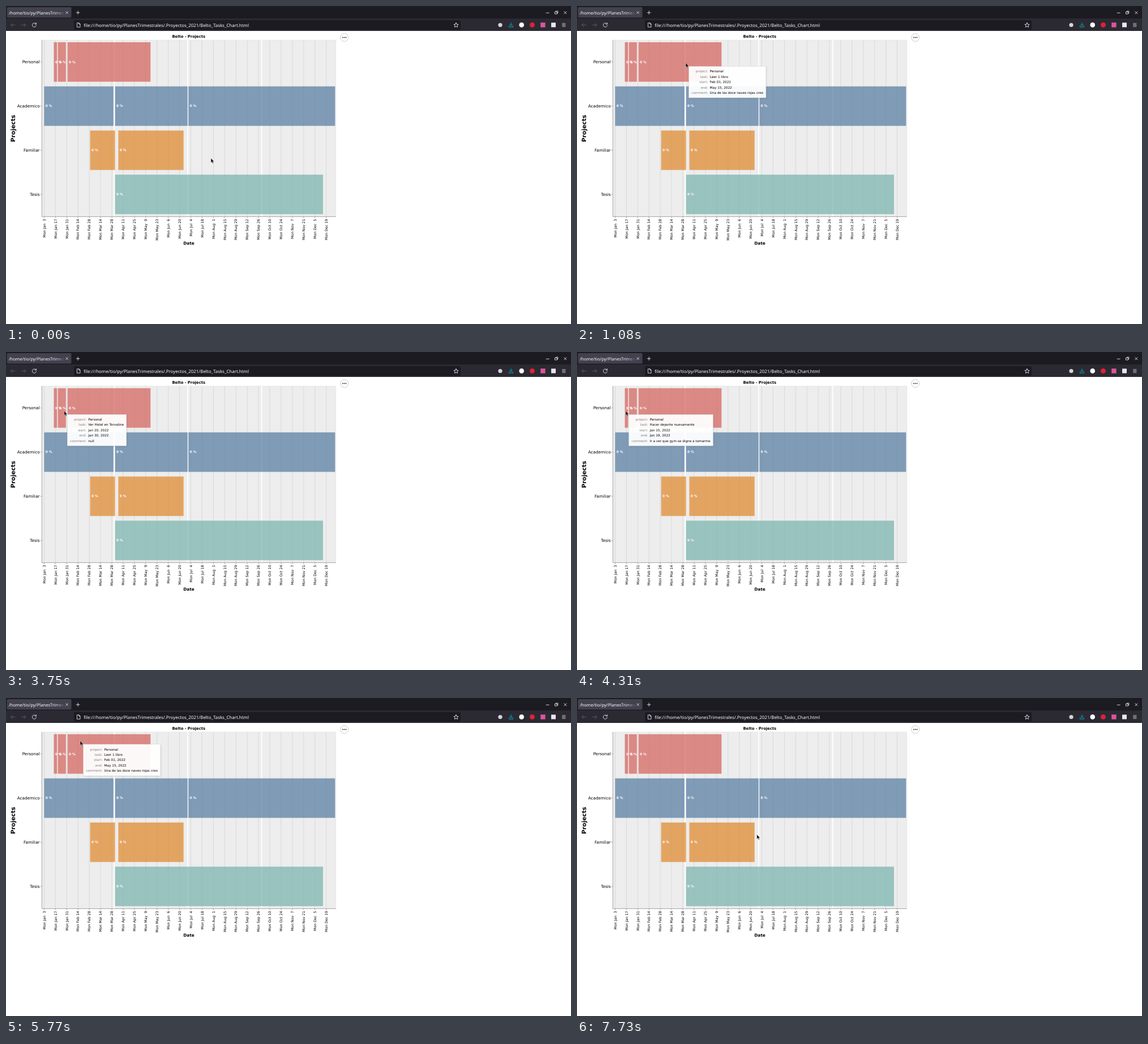
Write an HTML page that moves like this. It is 998 by 561 pixels and loops after 8 s.

```html
<!DOCTYPE html>
<html lang="es">
<head>
<meta charset="utf-8">
<title>Projects</title>
<style>
  html, body { margin: 0; width: 100%; height: 100%; overflow: hidden; background: #fff; }
  svg { display: block; width: 100%; height: 100%; }
  text { font-family: "DejaVu Sans", sans-serif; white-space: pre; text-rendering: geometricPrecision; }
  .ui { font-family: "Noto Sans", "Open Sans", sans-serif; fill: #fbfbfe; }
  .bold { font-weight: bold; }
  .mid { text-anchor: middle; }
  .end { text-anchor: end; }
  .line { fill: none; stroke: #fbfbfe; stroke-width: .8; stroke-linecap: round; stroke-linejoin: round; }
  .dim { stroke: #65646e; }
  .grid { stroke: #d2d2d2; stroke-width: .7; }
  .axis { stroke: #888; stroke-width: .7; fill: none; }
  .percent { font-size: 5.72px; fill: #fff; }
  #tip text { font-size: 5.72px; }
  #tip .key { fill: #808080; }
  #box { fill: #fff; fill-opacity: .95; stroke: #d9d9d9; stroke-width: .5; filter: drop-shadow(1px 1px 1px rgba(0,0,0,.12)); }
</style>
</head>
<body>
<svg viewBox="0 0 998 561" preserveAspectRatio="none">
  <defs>
    <linearGradient id="fade" gradientUnits="userSpaceOnUse" x1="86" x2="104" y1="0" y2="0">
      <stop stop-color="#fbfbfe"/><stop offset="1" stop-color="#fbfbfe" stop-opacity="0"/>
    </linearGradient>
    <clipPath id="tabClip"><path d="M2 2H104V20H2z"/></clipPath>
  </defs>

  <g id="browser">
    <path d="M0 0H998V22H0z" fill="#1c1b22"/>
    <path d="M0 22H998V44H0z" fill="#2b2a33"/>
    <rect x="1.5" y="2" width="114" height="18.5" rx="2" fill="#42414d"/>
    <text class="ui" x="5" y="14.6" font-size="7.6" style="fill:url(#fade)" clip-path="url(#tabClip)">/home/tio/py/PlanesTrimestrales</text>
    <path class="line" d="M105.8 9.8l3.6 3.6m0-3.6l-3.6 3.6M124.2 11.7h5.8m-2.9-2.9v5.8"/>
    <path class="line" d="M954.2 12.2h5M969.8 10.4h3.6v3.6h-3.6zM971.3 10.2V9h3.6v3.6h-1.2M985.8 9.6l4.2 4.2m0-4.2l-4.2 4.2"/>
    <path class="line dim" d="M16 33.5H8.6m3-3l-3 3 3 3M27.4 33.5h7.4m-3-3l3 3-3 3"/>
    <path class="line" d="M53 31.6a3.6 3.6 0 1 0 .5 2.6M53.4 29.6v2.4H51"/>
    <rect x="120" y="25" width="683" height="17" rx="2" fill="#1c1b22"/>
    <path class="line" d="M125.8 29.8h3.2l2 2v5.4h-5.2zM128.8 30v2h2"/>
    <text class="ui" x="137.3" y="36.5" font-size="7.89">file:///home/tio/py/PlanesTrimestrales/.Proyectos_2021/Belto_Tasks_Chart.html</text>
    <path class="line" d="M795 29.6l1.2 2.6 2.9.3-2.2 1.9.7 2.9-2.6-1.5-2.6 1.5.7-2.9-2.2-1.9 2.9-.3z"/>
    <circle cx="873" cy="33.5" r="3.6" fill="#d4d4da"/>
    <path class="line" style="stroke:#00c8e8" d="M892 29.6v5m-2.2-2.1l2.2 2.2 2.2-2.2M888.5 35v2h7v-2"/>
    <circle cx="910.7" cy="33.4" r="4.3" fill="#fff"/>
    <circle cx="929.5" cy="33.4" r="4.4" fill="#e0203a"/>
    <rect x="944.2" y="29.2" width="8.4" height="8.4" fill="#d8579a"/>
    <rect x="963" y="29.4" width="8" height="8" fill="#e8e8ea"/>
    <path class="line" d="M982.6 31h5.4m-5.4 2.5h5.4m-5.4 2.5h5.4"/>
  </g>

  <g id="chart"></g>

  <g id="menu">
    <circle cx="597.7" cy="55.5" r="7" fill="#fff" stroke="#aaa" stroke-width=".6"/>
    <path d="M594.9 55.5h.01M597.7 55.5h.01M600.5 55.5h.01" stroke="#222" stroke-width="1.8" stroke-linecap="round"/>
  </g>

  <g id="tip"><rect id="box" height="55.3"/></g>
  <path id="cursor" d="M0 0V8L1.9 6.4 3.1 9.3 4.5 8.7 3.2 5.9H5.6z" fill="#111" stroke="#fff" stroke-width=".4"/>
</svg>

<script>
const DURATION = 8000;
const LANE_TOP = 63.9, LANE_STEP = 77.87, BAR_HEIGHT = 69.7;
const FIRST_DAY = Date.UTC(2022, 0, 3), DAY_MS = 864e5, DAY_WIDTH = 1.4235;
const $ = id => document.getElementById(id);
const dayX = day => 67.4 + day * DAY_WIDTH;

const lanes = [
  { name: 'Personal', color: '#d5605b' },
  { name: 'Academico', color: '#5379a0' },
  { name: 'Familiar', color: '#e08628' },
  { name: 'Tesis', color: '#77b3ab' }
];

// lane, first day and last day counted from Jan 3, task, comment
const bars = [
  [0, 12, 16, 'Hacer deporte nuevamente', 'Ir a ver que gym se digne a tomarme'],
  [0, 17, 27, 'Ver Hotel en Torvaline', 'null'],
  [0, 29, 132, 'Leer 1 libro', 'Una de las doce naves rojas creo'],
  [1, 0, 86, 'Primer trimestre', 'null'],
  [1, 88, 178, 'Segundo trimestre', 'Rendir los parciales a tiempo'],
  [1, 179, 361, 'Segundo semestre', 'Aprobar las materias que falten del segundo semestre'],
  [2, 57, 88, 'Ordenar la casa', 'null'],
  [2, 92, 173, 'Pintar la casa', 'null'],
  [3, 88, 346, 'Escribir la tesis', 'null']
].map(([lane, from, to, task, comment]) => ({
  lane, from, to, task, comment,
  x: dayX(from), end: dayX(to), y: LANE_TOP + lane * LANE_STEP
}));

const dateOf = day => new Date(FIRST_DAY + day * DAY_MS);
const monthOf = date => date.toLocaleString('en-US', { month: 'short', timeZone: 'UTC' });
const longDate = day => {
  const d = dateOf(day);
  return `${monthOf(d)} ${String(d.getUTCDate()).padStart(2, '0')}, 2022`;
};

function drawChart() {
  const out = ['<path d="M63.3 60H582.7V371.6H63.3z" fill="#ededed" stroke="#ddd" stroke-width=".5"/>'];
  const line = (cls, d) => out.push(`<path class="${cls}" d="${d}"/>`);
  const label = (cls, x, y, size, str, extra = '') =>
    out.push(`<text class="${cls}" x="${x}" y="${y}" font-size="${size}" ${extra}>${str}</text>`);

  for (let i = 0; i < 26; i++) {
    const x = dayX(i * 14), d = dateOf(i * 14);
    line('grid', `M${x} 60V371.6`);
    line('axis', `M${x} 371.6v2.6`);
    label('end', 0, 0, 6.24, `Mon ${monthOf(d)} ${String(d.getUTCDate()).padStart(2)}`,
      `transform="translate(${x + 2.3} 375.8) rotate(-90)"`);
  }
  for (const day of [87, 178.2, 270]) {
    out.push(`<path d="M${dayX(day)} 60V371.6" stroke="#fff" stroke-width="1.7"/>`);
  }
  for (const b of bars) {
    out.push(`<rect x="${b.x}" y="${b.y}" width="${b.end - b.x}" height="${BAR_HEIGHT}" fill="${lanes[b.lane].color}" fill-opacity=".7"/>`);
  }
  for (const b of bars) label('bold percent', b.x + 2.4, b.y + 36.7, 5.72, '0 %');

  line('axis', 'M63.3 60V371.6H582.7');
  lanes.forEach((lane, i) => {
    const y = LANE_TOP + i * LANE_STEP + BAR_HEIGHT / 2;
    line('axis', `M60.7 ${y}h2.6`);
    label('end', 59.6, y + 2.4, 7.28, lane.name);
  });
  label('bold mid', 322.7, 56.2, 6.76, 'Belto - Projects');
  label('bold mid', 323, 421.2, 7.28, 'Date');
  label('bold mid', 0, 0, 10.4, 'Projects', 'transform="translate(15.8 216) rotate(-90)"');
  $('chart').innerHTML = out.join('');
}

const values = ['project', 'task', 'start', 'end', 'comment'].map((key, i) => {
  const add = (cls, x, str) => {
    const el = document.createElementNS('http://www.w3.org/2000/svg', 'text');
    el.setAttribute('class', cls);
    el.setAttribute('x', x);
    el.setAttribute('y', 10.8 + i * 9.38);
    el.textContent = str;
    return $('tip').appendChild(el);
  };
  add('key end', 33.8, key + ':');
  return add('value', 37, '');
});

// Pointer moves: steps taken, then keys of time, x, y and how far the tooltip lags behind
const moves = [
  { steps: 1, keys: [[0, 362, 268.5]] },
  { steps: 11, keys: [[120, 364, 262], [340, 384, 195], [480, 360, 100], [560, 300, 57], [700, 180, 70], [860, 108.9, 101]] },
  { steps: 2, keys: [[1010, 150, 101], [1080, 192, 100.3]] },
  { steps: 11, keys: [[3220, 160, 101, 14.4, .6], [3750, 102.9, 103.9], [3980, 84.6, 104.4]] },
  { steps: 2, keys: [[4310, 86, 104], [4380, 87.4, 103.6]] },
  { steps: 7, keys: [[5290, 85.8, 90.5, 1.6, 4.1], [5450, 100, 70], [5530, 112, 69.5], [5770, 131, 75.5]] },
  { steps: 9, keys: [[6240, 150, 82], [6400, 270, 140], [6570, 436, 204], [6750, 432, 110], [6900, 422, 55]] },
  { steps: 10, keys: [[7080, 422, 49], [7300, 420, 180], [7480, 395, 262], [7560, 370, 286], [7730, 317.7, 240.8]] }
];

function pointerAt(time) {
  const { steps, keys } = moves.findLast(m => m.keys[0][0] <= time);
  const start = keys[0][0], last = keys[keys.length - 1];
  const step = (last[0] - start) / Math.max(1, steps - 1) || 1;
  const t = Math.min(last[0], start + step * Math.floor((time - start) / step + .05));
  const next = keys.findIndex(k => k[0] >= t);
  const b = keys[next], a = keys[Math.max(0, next - 1)];
  const u = b === a ? 0 : (t - a[0]) / (b[0] - a[0]);
  return [1, 2, 3, 4].map(i => (a[i] || 0) + ((b[i] || 0) - (a[i] || 0)) * u);
}

let shownBar = null;
function showTip(bar) {
  if (bar === shownBar) return;
  shownBar = bar;
  $('tip').style.display = bar ? '' : 'none';
  if (!bar) return;
  [lanes[bar.lane].name, bar.task, longDate(bar.from), longDate(bar.to), bar.comment]
    .forEach((str, i) => { values[i].textContent = str; });
  $('box').setAttribute('width', 41.8 + Math.max(...values.map(v => v.getComputedTextLength())));
}

function render(time) {
  const [x, y, lagX, lagY] = pointerAt(time);
  const hoverX = x + lagX, hoverY = y + lagY;
  $('cursor').setAttribute('transform', `translate(${x} ${y})`);
  $('tip').setAttribute('transform', `translate(${hoverX + 5.6} ${hoverY + 6.3})`);
  showTip(bars.find(b => hoverX >= b.x && hoverX <= b.end && hoverY >= b.y && hoverY <= b.y + BAR_HEIGHT));
}

drawChart();
const origin = performance.now();
function tick() {
  render((performance.now() - origin) % DURATION);
  requestAnimationFrame(tick);
}
tick();
</script>
</body>
</html>
```
